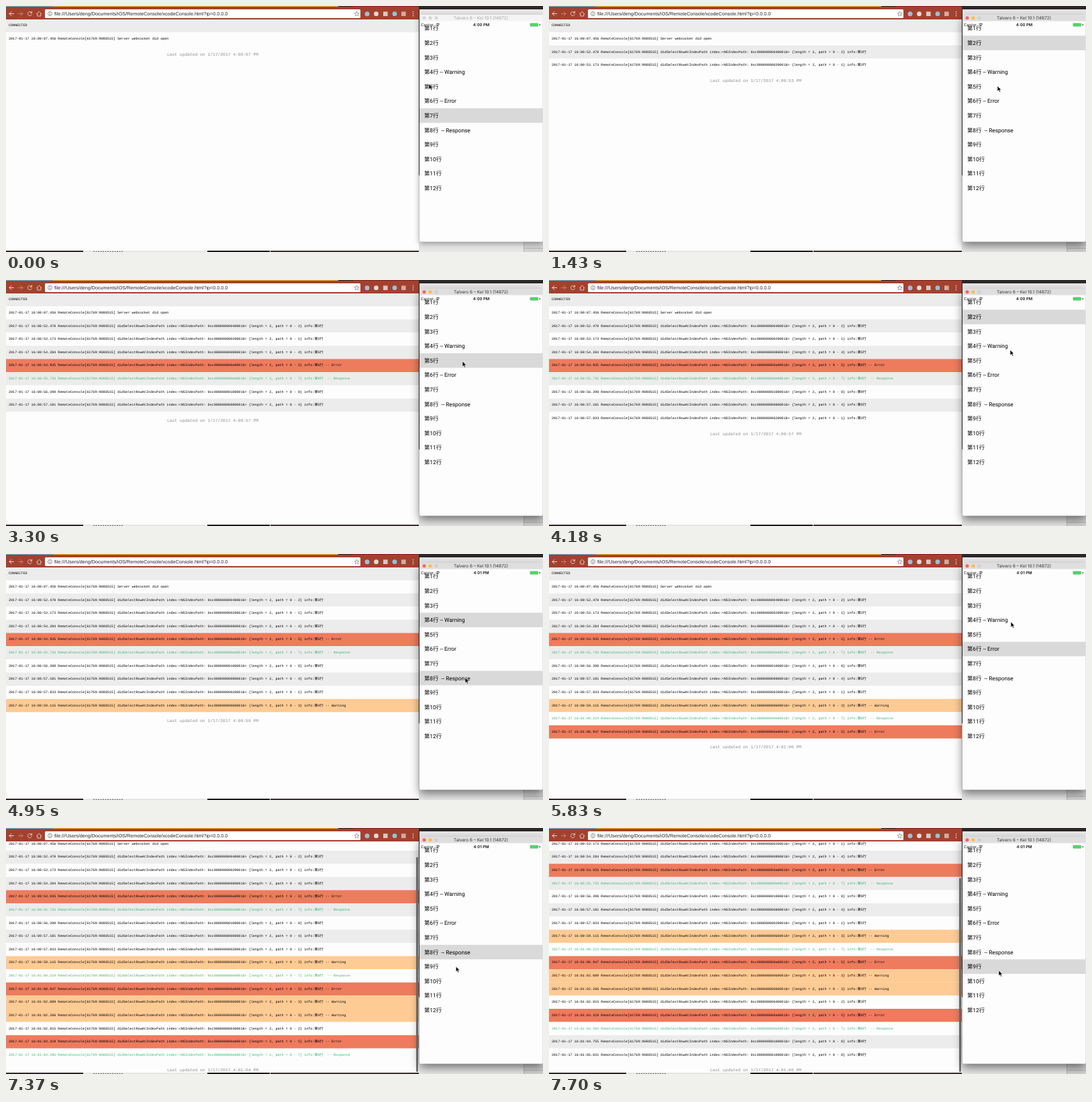
Write an HTML page that moves like this. It is 800 by 366 pixels and loops after 7810 ms.

```html
<!DOCTYPE html>
<html lang="en">
<head>
<meta charset="utf-8">
<title>Remote console</title>
<style>
  html, body { margin: 0; width: 100%; height: 100%; overflow: hidden; background: #fff; }
  svg { display: block; width: 800px; height: 366px; }
  text { white-space: pre; text-rendering: geometricPrecision; }
  .mono { font-family: "Liberation Mono", "Noto Sans CJK SC", monospace; }
  .ui { font-family: Inter, sans-serif; }
  .cell { font-family: Roboto, "Noto Sans CJK SC", sans-serif; }
  .url { font-family: "Liberation Sans", sans-serif; }
</style>
</head>
<body>
<svg id="stage" viewBox="0 0 800 366" xmlns="http://www.w3.org/2000/svg">
  <defs>
    <clipPath id="page"><rect x="0" y="20" width="615" height="344"/></clipPath>
    <filter id="near" x="-20%" y="-10%" width="140%" height="120%">
      <feDropShadow dx="0" dy="3" stdDeviation="4" flood-color="#000" flood-opacity=".36"/>
    </filter>
    <filter id="far" x="-20%" y="-10%" width="140%" height="120%">
      <feDropShadow dx="0" dy="6" stdDeviation="7" flood-color="#000" flood-opacity=".5"/>
    </filter>
  </defs>
</svg>
<script>
const LOOP = 7810, STEP = 110;
const START = 51.25, RATE = 1.8;      // log seconds at loop start, log seconds per second
const ROW = 19.62, TOP = 19.4, VIEW = 345;
const CELL = 21.6, FIRST = 33.4;
const HOLD = 0.22;                    // finger-down time before a selection is logged
const PAPER = "#fefdfe", DARK = "#2d2628";

// log time, row index, pointer x, pointer y
const clicks = [
  [52.470, 2, 655, 76], [53.173, 1, 660, 56], [54.284, 4, 668, 119],
  [54.935, 5, 671, 141], [55.735, 7, 672, 180], [56.398, 8, 674, 206],
  [57.181, 4, 680, 121], [57.833, 1, 684, 57], [59.115, 3, 687, 104],
  [60.224, 7, 684, 184], [60.947, 5, 686, 142], [62.089, 3, 688, 101],
  [62.266, 3, 688, 101], [62.815, 2, 689, 78], [63.319, 5, 689, 141],
  [64.285, 7, 676, 185], [64.755, 8, 670, 207], [65.031, 8, 670, 212]
];
const kinds = { 3: " -- Warning", 5: " -- Error", 7: "  -- Response" };
const fills = { 3: "#fecb94", 5: "#ee7b5d" };
const label = i => `第${i + 1}行${kinds[i] || ""}`;

const stage = document.getElementById("stage");

function add(parent, tag, attrs, content) {
  const el = document.createElementNS("http://www.w3.org/2000/svg", tag);
  for (const key in attrs) el.setAttribute(key, attrs[key]);
  if (content !== undefined) el.textContent = content;
  parent.appendChild(el);
  return el;
}
const rect = (p, x, y, width, height, fill, more) => add(p, "rect", { x, y, width, height, fill, ...more });
const dot = (p, cx, cy, r, fill) => add(p, "circle", { cx, cy, r, fill });
const line = (p, d, stroke, width, more) =>
  add(p, "path", { d, stroke, "stroke-width": width, fill: "none", ...more });
const text = (p, x, y, size, cls, fill, str, more) =>
  add(p, "text", { x, y, "font-size": size, class: cls, fill, ...more }, str);
const show = (el, on) => el.setAttribute("visibility", on ? "visible" : "hidden");

function stamp(sec) {
  const m = Math.floor(sec / 60);
  return `16:0${m}:${(sec - m * 60).toFixed(3).padStart(6, "0")}`;
}
function clock(sec) {
  const m = Math.floor(sec / 60);
  return `4:0${m}:${String(Math.floor(sec - m * 60)).padStart(2, "0")} PM`;
}
const entry = (sec, msg) => `2017-01-17 ${stamp(sec)} RemoteConsole[61769:9088515] ${msg}`;
function selection(sec, i) {
  const addr = "0xc" + (i * 0x200000 + 0x16).toString(16).padStart(15, "0");
  return entry(sec, `didSelectRowAtIndexPath index:<NSIndexPath: ${addr}> {length = 2, path = 0 - ${i}} info:${label(i)}`);
}

// Desktop behind the windows
rect(stage, 0, 0, 800, 366, "#e6e6e6");
rect(stage, 615, 0, 185, 5, DARK);
rect(stage, 615, 5, 1, 247, DARK);
rect(stage, 771, 351, 29, 15, "#d2d2d2");
line(stage, "M771.5 350V366M772 360.5H800", "#a9a9a9", 0.7);
rect(stage, 0, 364, 115, 2, DARK);
line(stage, "M130 365.3H175", "#555", 1, { "stroke-dasharray": "2 1.5" });
rect(stage, 300, 364, 93, 2, "#1c1718");
rect(stage, 394, 364, 221, 2, "#3a302f");

// Browser page
rect(stage, 0, 20, 615, 344, PAPER);
const view = add(stage, "g", { "clip-path": "url(#page)" });
const log = add(view, "g", {});

function logRow(n, str, fill, ink) {
  const g = add(log, "g", {}), y = TOP + n * ROW;
  rect(g, 0, y, 615, ROW, fill || (n % 2 ? PAPER : "#ececec"));
  text(g, 4, y + 10.9, 5.1, "mono", ink || "#000", str);
  return g;
}
logRow(0, "CONNECTED");
logRow(1, entry(7.456, "Server websocket did open"));
const rows = clicks.map(([sec, i], n) =>
  logRow(n + 2, selection(sec, i), fills[i], i === 7 ? "#3cb371" : null));
const updated = text(log, 308, 0, 6.3, "mono", "#8c8c8c", "", { "text-anchor": "middle" });
const thumb = rect(stage, 611, 20, 3, 10, "#777", { rx: 1.5 });

// Browser toolbar
rect(stage, 0, 0, 615, 20, "#a3412f");
rect(stage, 0, 0, 70, 1, "#6fb4cf");
rect(stage, 70, 0, 425, 1, "#e6bd3f");
rect(stage, 495, 0, 22, 1, DARK);
rect(stage, 517, 0, 98, 1, "#7a2420");
rect(stage, 58, 5, 470, 13, "#fff", { rx: 1.5 });
const round = { "stroke-linecap": "round", "stroke-linejoin": "round" };
line(stage, "M11.5 11.5H5M8 8.5L5 11.5L8 14.5", "#f6e6e2", 0.9, round);
line(stage, "M18.5 11.5H25M22 8.5L25 11.5L22 14.5", "#c98a7e", 0.9, round);
line(stage, "M38 9.6A3.1 3.1 0 1 0 38.4 12.6M38.5 8V10.4H36", "#ecd0c9", 0.9, round);
line(stage, "M45.5 11.8L49.3 8.3L53.1 11.8M46.8 11.5V15H51.8V11.5", "#ecd0c9", 0.9, round);
add(stage, "circle", { cx: 65.5, cy: 11.5, r: 3, fill: "none", stroke: "#666", "stroke-width": 0.8 });
line(stage, "M65.5 11V13.3M65.5 9.5V10.3", "#666", 0.8);
text(stage, 72, 14, 7.18, "url", "#222",
  "file:///Users/deng/Documents/iOS/RemoteConsole/xcodeConsole.html?ip=0.0.0.0");
line(stage, "M522.5 8L523.5 10.5L526 10.7L524.1 12.3L524.7 14.8L522.5 13.4L520.3 14.8L520.9 12.3L519 10.7L521.5 10.5Z", "#777", 0.7);
dot(stage, 538, 11.7, 3.5, "#a9b9d4");
dot(stage, 551.5, 11.7, 3.4, "#e9d8d4");
rect(stage, 562, 8.4, 6.6, 6.6, "#dcc6c1");
dot(stage, 579, 11.7, 3.4, "#8fc4d6");
rect(stage, 589, 8.4, 6.6, 6.6, "#d3aaa1");
for (const y of [8.8, 11.7, 14.6]) dot(stage, 606.5, y, 0.8, "#f6e6e2");

// Phone window
const phone = rect(stage, 616, 13, 183.5, 337.5, PAPER, { rx: 2 });
const bar = rect(stage, 616, 13, 183.5, 9.5, "#dedede");
const lights = [623, 632, 641].map(x => dot(stage, x, 17.7, 2.5, "#ccc"));
const title = text(stage, 707.5, 20, 6.4, "ui", "#333", "Talvero 6 – Kel 10.1 (14B72)", { "text-anchor": "middle" });

const cells = [];
for (let i = 0; i < 12; i++) {
  const y = FIRST + i * CELL;
  cells.push(rect(stage, 616, y - CELL / 2, 183.5, CELL, "#d9d9d9"));
  text(stage, 623, y + 3, 8.34, "cell", "#000", label(i));
}
text(stage, 618, 30.3, 5.8, "ui", "#222", "Carrier");
line(stage, "M640.6 27.2Q643.3 24.8 646 27.2M641.8 28.6Q643.3 27.2 644.8 28.6", "#222", 0.9);
dot(stage, 643.3, 29.8, 0.7, "#222");
const phoneClock = text(stage, 708, 30.3, 5.9, "ui", "#111", "", { "text-anchor": "middle", "font-weight": 600 });
rect(stage, 780.8, 25.7, 12, 4.6, "#4cd964", { rx: 0.9, stroke: "#8b8b8b", "stroke-width": 0.4 });
rect(stage, 794.6, 27, 1.2, 2, "#333");

const pointer = add(stage, "path", {
  d: "M0 0V8L1.9 6.3L3.2 9.2L4.6 8.6L3.3 5.8H5.8Z",
  fill: "#000", stroke: "#fff", "stroke-width": 0.6
});

// Travel takes the early middle part of each gap between clicks
function pointerAt(sec, done) {
  const from = done ? clicks[done - 1] : [START, 6, 630, 116];
  const to = clicks[done] || from;
  const gap = to[0] - from[0] || 1;
  const u = Math.min(1, Math.max(0, ((sec - from[0]) / gap - 0.1) / 0.45));
  const e = u * u * (3 - 2 * u);
  return [2, 3].map(k => from[k] + (to[k] - from[k]) * e);
}

function draw(ms) {
  const sec = START + RATE * Math.floor(ms / STEP) * STEP / 1000;
  const done = clicks.filter(c => c[0] <= sec).length;
  const next = clicks[done];
  const end = TOP + (done + 2) * ROW;
  const scroll = Math.max(0, end + 13.5 - 361);

  rows.forEach((g, n) => show(g, n < done));
  log.setAttribute("transform", `translate(0 ${-scroll})`);
  updated.setAttribute("y", end + 14.9);
  updated.textContent = `Last updated on 1/17/2017 ${clock(done ? clicks[done - 1][0] : 7)}`;

  const scale = VIEW / (VIEW + scroll);
  show(thumb, scroll > 0);
  thumb.setAttribute("y", 20 + scroll * scale);
  thumb.setAttribute("height", VIEW * scale - 2);

  const picked = done ? clicks[done - 1][1] : 6;
  const held = next && next[0] - sec < HOLD ? next[1] : -1;
  cells.forEach((c, i) => show(c, i === picked || i === held));
  phoneClock.textContent = sec < 60 ? "4:00 PM" : "4:01 PM";

  const active = done > 0 || held >= 0;
  phone.setAttribute("filter", active ? "url(#far)" : "url(#near)");
  bar.setAttribute("fill", active ? "#dedede" : "#f4f4f4");
  title.setAttribute("fill", active ? "#333" : "#a5a5a5");
  ["#fc605b", "#fdbc40", "#cfcfcf"].forEach((c, i) => lights[i].setAttribute("fill", active ? c : "#d6d6d6"));

  const [x, y] = pointerAt(sec, done);
  pointer.setAttribute("transform", `translate(${x} ${y})`);
}

const begin = performance.now();
function tick() {
  draw((performance.now() - begin) % LOOP);
  requestAnimationFrame(tick);
}
draw(0);
requestAnimationFrame(tick);
</script>
</body>
</html>
```
